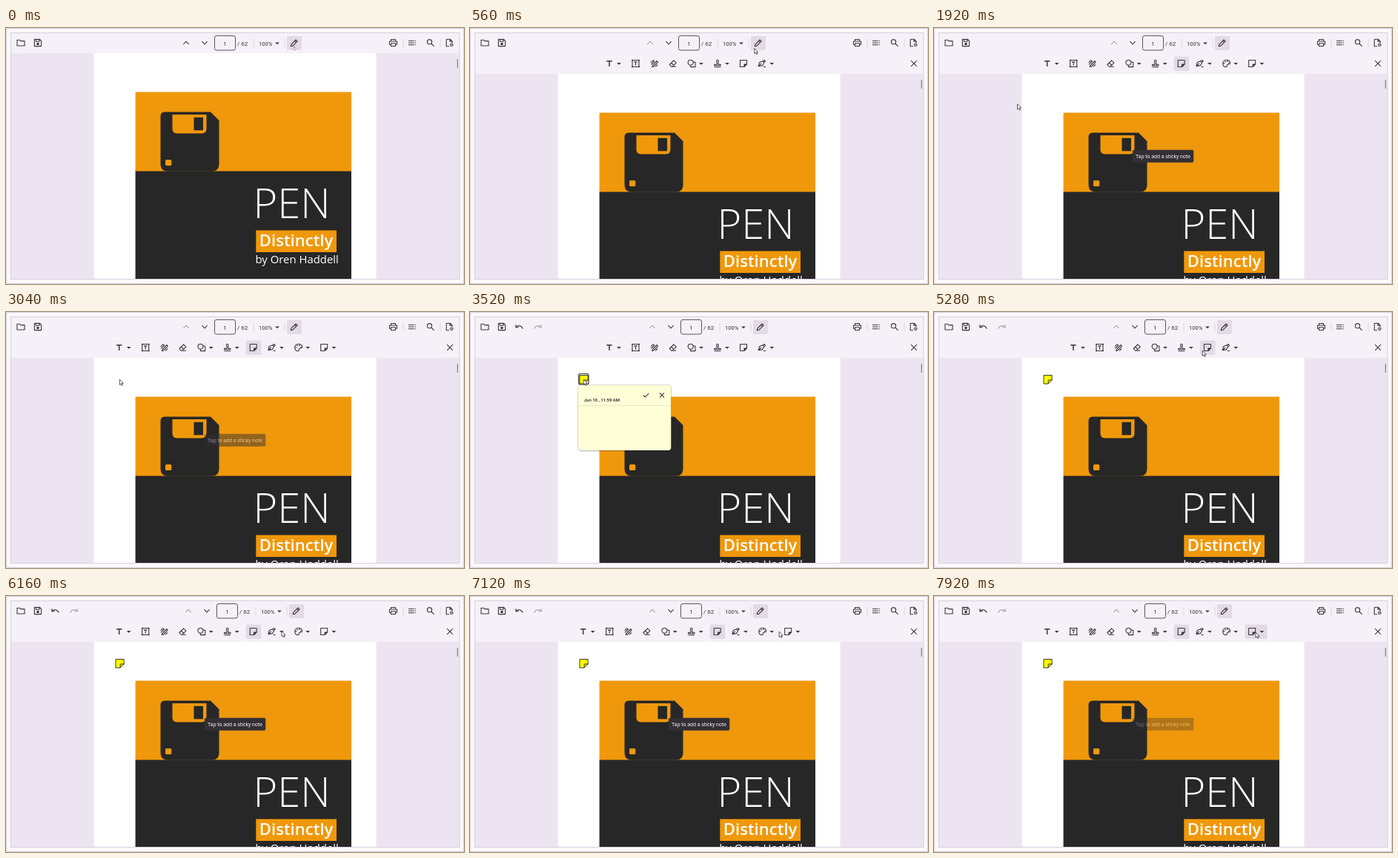
An HTML page that plays this animation: 618 px wide and 346 px high, repeating every 8 s.

```html
<!DOCTYPE html>
<html lang="en">
<head>
<meta charset="utf-8">
<title>Sticky note demo</title>
<style>
html, body { margin: 0; width: 100%; height: 100%; overflow: hidden; background: #fdf8fe; }
svg { display: block; width: 618px; height: 346px; }
.ui { font-family: Roboto, Arial, sans-serif; font-size: 7.9px; fill: #343038; }
.cover { font-family: "Open Sans", "Noto Sans", sans-serif; fill: #fff; }
.icon { fill: none; stroke: #39353e; stroke-width: 1.1; stroke-linejoin: round; }
.icon .solid { fill: #39353e; stroke: none; }
.off { opacity: .4; }
</style>
</head>
<body>
<svg viewBox="0 0 618 346">
  <defs><clipPath id="view"><rect x="7" y="7" width="605" height="332"/></clipPath></defs>
  <rect x=".5" y=".5" width="617" height="345" fill="#fdf8fe" stroke="#d6d0d9"/>
  <g clip-path="url(#view)">
    <rect x="6" y="6" width="606" height="334" fill="#ece4f1"/>
    <g id="page">
      <rect x="118.500" y="34" width="381" height="320" fill="#fff"/>
      <rect x="174.600" y="86.500" width="291.400" height="108" fill="#f0980b"/>
      <rect x="174.600" y="193.500" width="291.400" height="160" fill="#272727"/>
      <path fill="#272727" d="M214 113.500H276L287.500 125V184Q287.500 193.700 278 193.700H218Q208.500 193.700 208.500 184V119.500Q208.500 113.500 214 113.500Z"/>
      <path fill="#f0980b" d="M224.500 117H270.500V136Q270.500 142.500 264 142.500H231Q224.500 142.500 224.500 136Z"/>
      <rect x="253.500" y="120.800" width="12.500" height="17.500" fill="#272727"/>
      <rect x="215" y="178" width="8.300" height="8" rx="1.500" fill="#f0980b"/>
      <g class="cover">
        <text x="333.500" y="257" font-size="56" font-weight="300">PEN</text>
        <rect x="337.300" y="273.500" width="108.700" height="29.500" fill="#f0980b"/>
        <text x="341.800" y="295" font-size="22.100" font-weight="600">Distinctly</text>
        <text x="336.500" y="318" font-size="14.900" font-weight="500">by Oren Haddell</text>
      </g>
      <rect x="608.700" y="42" width="1.300" height="12" fill="#8c8791"/>
    </g>
    <rect id="bar" x="6" y="6" width="606" height="28" fill="#f6f0f8"/>
    <g id="top"></g>
    <g id="tools"></g>
    <g id="note">
      <rect id="ring" x="146.700" y="83.500" width="13.300" height="14.500" rx="1.800" fill="#fff" stroke="#37343b" stroke-width="1.200"/>
      <path d="M148 85.500H159.200V92L154.200 97H148ZM154.200 97V92H159.200" fill="#ff0" stroke="#222" stroke-width=".9"/>
    </g>
    <g id="popup">
      <rect x="144.800" y="98" width="127.700" height="91" rx="5" fill="#000" opacity=".06"/>
      <rect x="145.500" y="98.200" width="126.300" height="89.700" rx="4.500" fill="#000" opacity=".2"/>
      <rect x="146" y="98.700" width="125.300" height="88.400" rx="4" fill="#fffed6"/>
      <path d="M146 126.500H271" stroke="#e3e0c9" stroke-width=".8"/>
      <circle id="halo" cx="237.500" cy="112.500" r="10" fill="#e6e2c3"/>
      <text class="ui" x="153.800" y="121" style="font-size:5.950px;font-weight:500;fill:#1d1b20">Jun 10 , 11:59 AM</text>
    </g>
    <g id="tip">
      <rect x="268" y="164.800" width="82.300" height="17" rx="2" fill="#322f35"/>
      <text class="ui" x="309" y="175.800" text-anchor="middle" style="font-size:7px;fill:#f5eff7">Tap to add a sticky note</text>
    </g>
  </g>
  <rect x="6.500" y="6.500" width="605.500" height="333" fill="none" stroke="#d8cfdd"/>
  <g id="cursor" fill="#fff" stroke="#2b2930" stroke-width=".75" stroke-linejoin="round">
    <path id="arrow" d="M0 0V7.200L1.700 5.700L2.900 8.300L4.100 7.700L3 5.300H5.100Z"/>
    <path id="hand" stroke="#77727c" stroke-width=".6" d="M.2 0Q.8-.6 1.300.2V1.900L3 2.400V4L2.400 5.300H.5L-.7 3.400Q-.5 2.800.2 3.200Z"/>
  </g>
</svg>
<script>
const LOOP = 8000;
const $ = id => document.getElementById(id);

// Icons sit around their own centre: outline | solid parts.
const ICONS = {
  folder: 'M-5-3.700H-1.400L-.2-2.400H5V4H-5Z',
  save: 'M-4.600-4.600H2.600L4.600-2.600V4.600H-4.600ZM-2.600-4.400V-1.700H2V-4.400|M-1.800 1.600a1.800 1.800 0 1 0 3.600 0a1.800 1.800 0 1 0-3.600 0Z',
  up: 'M-3.600 1.800L0-1.800L3.600 1.800',
  down: 'M-3.600-1.800L0 1.800L3.600-1.800',
  undo: 'M-4.700-2.800V.8H-1M-4.500.6C-1.500-2.600 3-1.800 4.800 2.600',
  redo: 'M4.700-2.800V.8H1M4.500.6C1.500-2.600-3-1.800-4.800 2.600',
  edit: 'M-4.500 4.500L-3.900 1.900L2.200-4.200L4.200-2.200L-1.900 3.900ZM.8-2.800L2.800-.8',
  print: 'M-3-2V-4.500H3V-2M-3 2.200H-5V-2H5V2.200H3M-3 .8H3V4.500H-3Z',
  list: 'M-5-2.800H2.700M-5 0H2.700M-5 2.800H2.700M3.700-2.800H5M3.700 0H5M3.700 2.800H5',
  search: 'M1.600-1.300a3.100 3.100 0 1 0-6.200 0a3.100 3.100 0 1 0 6.200 0ZM.8 1L4.700 4.800',
  setup: 'M-.5 4.800H-4.300V-4.800H.8L3.600-2V0M.5-4.500V-1.700H3.500|M5 2.800a2.200 2.200 0 1 0-4.400 0a2.200 2.200 0 1 0 4.400 0ZM2.400 0H3.200V5.600H2.400ZM0 2.400H5.600V3.200H0Z',
  text: '|M-3.700-4.100H3.700V-2.600H.75V4.100H-.75V-2.600H-3.700Z',
  box: 'M-4.500-4.500H4.500V4.500H-4.500ZM-2.300-2.100H2.300M0-2.100V2.700|M-5.300-5.300h1.800v1.800h-1.800ZM3.500-5.300h1.800v1.800h-1.800ZM-5.300 3.500h1.800v1.800h-1.800ZM3.500 3.500h1.800v1.800h-1.800Z',
  scribble: 'M-4.800-1.200L-1.500-4.300L0-3L-4.300 1.300M-3 4.600L-2.400 2.600L3.300-3.500L4.900-1.900L-1 4ZM1.500 4.300L4.500 1.500',
  eraser: 'M-4.500 1.500L1.200-4.200L4.500-.9L-.8 4.300H-2ZM-2-1L1.600 2.600M0 4.300H4.500',
  shape: 'M2.200-1.300a3.500 3.500 0 1 0-7 0a3.500 3.500 0 1 0 7 0ZM2.400-2H5V4.600H-1.300V2.200',
  stamp: 'M-1 1.200L-.8-1.200C-3.200-5.900 3.200-5.900.8-1.200L1 1.200H4.200V2.700H-4.200V1.200ZM-4.400 4.800H4.400',
  note: 'M-4.500-4.500H4.500V1L1 4.500H-4.500ZM1 4.500V1H4.500|M1 4.500V1H4.500Z',
  pen: 'M-4.800 3.800L-3.500-1.500L1-3.300L2.800-1.300L.8 2.600ZM-4.500 3.500L-.8-.2M1.300-3.200L2.800-4.700L4.500-3L2.800-1.400M2 4.500H5',
  palette: 'M.3 4.800C-6.500 4.600-6.200-4.800.3-4.800C6.200-4.800 6.500 1.500 2.500 1.200C-.5 1.200 2.200 4.500.3 4.800Z|M-3.800-.9h1.500v1.500h-1.500ZM-2.200-3.400h1.500v1.500h-1.500ZM.8-3.400h1.500v1.500H.8ZM2.600-1.200h1.400V.2H2.600Z',
  close: 'M-3.900-3.900L3.900 3.900M3.900-3.900L-3.900 3.900',
  cross: 'M-3-3L3 3M3-3L-3 3',
  check: 'M-3.500.2L-1 2.700L3.700-2.400',
  caret: '|M-2.900-1.300H2.900L0 1.600Z'
};

function icon(name, x, y) {
  const [line, solid] = ICONS[name].split('|');
  return `<g class="icon" transform="translate(${x} ${y})">` +
    `<path d="${line}"/>${solid ? `<path class="solid" d="${solid}"/>` : ''}</g>`;
}
const pad = (id, x, w, y, h) =>
  `<rect id="${id}" x="${x}" y="${y}" width="${w}" height="${h}" rx="2" fill="#e2dbe5"/>`;
const divider = x => `<path d="M${x} 14.500V26" stroke="#d5cdd9" stroke-width=".8"/>`;

$('top').innerHTML =
  icon('folder', 20, 20) + icon('save', 43, 20) +
  `<g id="history">${icon('undo', 66.5, 20)}<g class="off">${icon('redo', 91.5, 20)}</g></g>
  <g id="middle">
    <g id="prev">${icon('up', 243, 20)}</g>${icon('down', 268, 20)}
    <rect x="281.500" y="10.500" width="28" height="19.500" rx="2.500" fill="none" stroke="#59545e"/>
    <text class="ui" x="295.500" y="23.500" text-anchor="middle">1</text>
    <text class="ui" x="312" y="23.500">/ 62</text>
    ${divider(334)}
    <text class="ui" x="341" y="23.500" style="font-size:7.600px">100%</text>
    ${icon('caret', 366, 20.7)}${divider(376)}
    ${pad('editPad', 379, 20, 11, 19)}${icon('edit', 388.8, 20.2)}
  </g>` +
  icon('print', 522.5, 20) + divider(536) + icon('list', 548, 20) +
  icon('search', 573, 20) + divider(586) + icon('setup', 598.5, 20);

const TOOLS = [['text', 188, 201], ['box', 223.5], ['scribble', 248.7], ['eraser', 273.7],
  ['shape', 299, 312], ['stamp', 334, 347], ['note', 369], ['pen', 394, 407.3]];
const MORE = [['palette', 429.7, 442.5], ['note', 464.5, 477.7]];
const row = list => list.map(([name, x, drop]) =>
  icon(name, x, 48) + (drop ? icon('caret', drop, 48.2) : '')).join('');

$('tools').innerHTML =
  `<g id="strip">${pad('notePad', 359, 20.5, 38.5, 19.5)}${pad('stylePad', 455, 30, 38.5, 19.5)}
    ${row(TOOLS)}<g id="more">${row(MORE)}</g></g>` + icon('close', 599, 48);

$('popup').insertAdjacentHTML('beforeend',
  icon('check', 237.5, 112.3) + icon('cross', 259, 112.3));

// Clicks, in ms
const OPEN = 320, PICK = 1120, PLACE = 3280, DONE = 4800, REPICK = 5960;
const TIP_STAY = 1800, TIP_FADE = 240;

// Pointer stops: time, x, y
const PATH = [
  [0, 388, 24.5], [280, 388, 24.5], [560, 383.7, 27.5], [1000, 369, 46], [1240, 369, 46],
  [1920, 112.5, 102.7], [2080, 112.5, 102.7], [2480, 130, 86], [2960, 153.3, 91.2],
  [3600, 153.3, 91.2], [4400, 237.2, 112], [4880, 237.2, 112], [5360, 372, 47.5],
  [6240, 372, 47.5], [7040, 415, 48], [7440, 434, 49], [LOOP, 434, 49]
];

function pointer(t) {
  const i = Math.max(1, PATH.findIndex(p => p[0] >= t));
  const [t0, x0, y0] = PATH[i - 1], [t1, x1, y1] = PATH[i];
  const u = (t - t0) / (t1 - t0), e = u * u * (3 - 2 * u);
  return [x0 + (x1 - x0) * e, y0 + (y1 - y0) * e];
}

const within = (t, a, b) => t >= a && t < b;
const show = (id, on) => { $(id).style.display = on ? '' : 'none'; };
const move = (id, x, y) => $(id).setAttribute('transform', `translate(${x} ${y})`);

function tipAlpha(t) {
  const start = t >= REPICK ? REPICK : PICK;
  if (t < start) return 0;
  return Math.max(0, Math.min(1, 1 - (t - start - TIP_STAY) / TIP_FADE));
}

function draw(t) {
  const open = t >= OPEN, placed = t >= PLACE;
  const picked = within(t, PICK, PLACE) || t >= REPICK;
  const editing = within(t, PLACE, DONE);
  const [x, y] = pointer(t);
  const overRow = open && y > 38 && y < 58;

  move('page', 0, open ? 28 : 0);
  $('bar').setAttribute('height', open ? 56 : 28);
  show('tools', open);
  $('prev').setAttribute('class', open ? 'off' : '');
  show('history', placed);
  move('middle', placed ? 3 : 0, 0);

  move('strip', picked ? -35.3 : 0, 0);
  show('more', picked);
  show('notePad', picked || (overRow && x > 359 && x < 380));
  show('stylePad', picked && overRow && x > 420);

  show('note', placed);
  show('ring', editing);
  show('popup', editing);
  show('halo', Math.hypot(x - 237.5, y - 112.5) < 10);
  $('tip').style.opacity = tipAlpha(t);

  move('cursor', x, y);
  show('hand', !open);
  show('arrow', open);
}

function tick() {
  draw(performance.now() % LOOP);
  requestAnimationFrame(tick);
}
tick();
</script>
</body>
</html>
```
